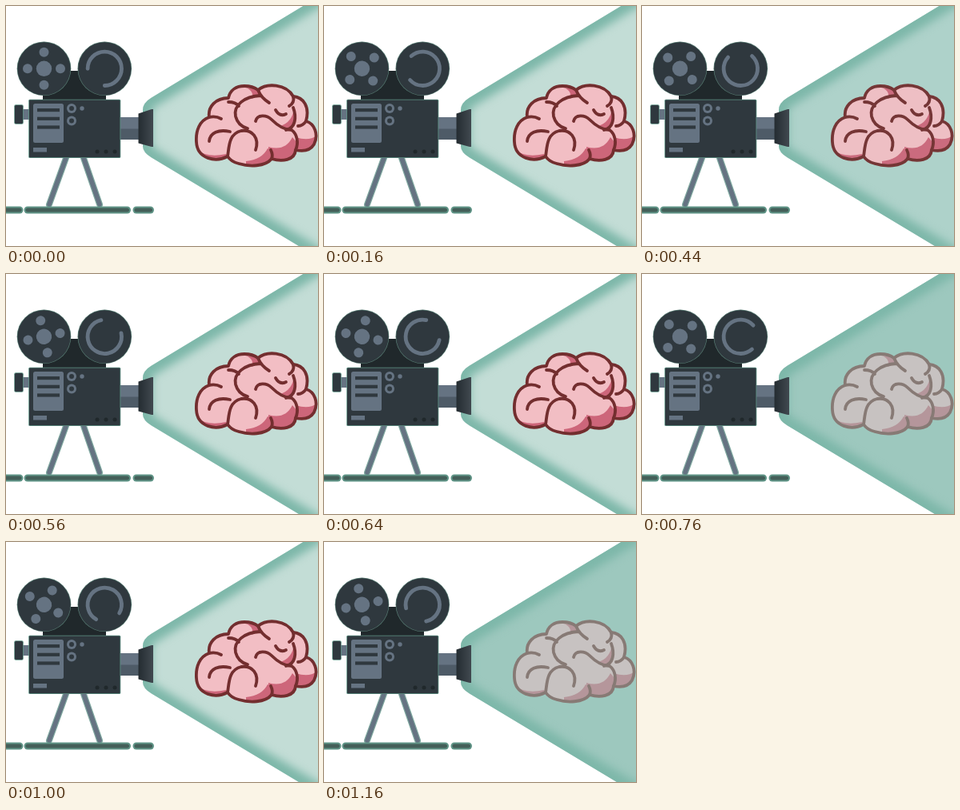
Write an HTML page with a canvas that moves like this. It is 390 by 300 pixels and loops after 1.2 s.

```html
<!DOCTYPE html>
<html lang="en">
<head>
<meta charset="utf-8">
<title>Projector</title>
<style>
html, body { margin: 0; width: 100%; height: 100%; overflow: hidden; background: #fff; }
canvas { display: block; }
</style>
</head>
<body>
<canvas id="stage" width="390" height="300"></canvas>
<script>
const W = 390, H = 300, STEP = 40, STEPS = 30;
const ctx = document.getElementById('stage').getContext('2d');
const DARK = '#2f383e', DEEP = '#20282b', GRAY = '#657382', RIM = '#7db7a9', FRINGE = '#5f9486';
const PINK = '#f2bec4', ROSE = '#cd667a', LINE = '#732e2f';

// Flicker, repeated three times per loop: beam level and brain opacity
const BEAM = ['#c3ddd6', '#aed2ca', '#9dc8be'];
const LEVEL = [0, 1, 1, 1, 0, 0, 0, 0, 1, 2];
const ALPHA = [1, .95, .8, .9, 1, 1, 1, 1, .75, .5];

function layer(draw) {
  const c = document.createElement('canvas');
  c.width = W;
  c.height = H;
  draw(c.getContext('2d'));
  return c;
}

function disc(g, x, y, r, color) {
  g.fillStyle = color;
  g.beginPath();
  g.arc(x, y, r, 0, 7);
  g.fill();
}

function box(g, x, y, w, h, r, color) {
  g.fillStyle = color;
  g.beginPath();
  g.roundRect(x, y, w, h, r);
  g.fill();
}

function fringedBox(g, x, y, w, h, r, color) {
  box(g, x - .8, y - .8, w + 1.6, h + 1.6, r + .5, FRINGE);
  box(g, x, y, w, h, r, color);
}

function line(g, x1, y1, x2, y2, width, color) {
  g.lineCap = 'round';
  g.lineWidth = width;
  g.strokeStyle = color;
  g.beginPath();
  g.moveTo(x1, y1);
  g.lineTo(x2, y2);
  g.stroke();
}

function poly(g, d, color) {
  g.fillStyle = color;
  g.fill(new Path2D(d));
}

const cone = new Path2D('M450 -47.5 L182 114.5 Q171 121 171 130 V175 Q171 183 182 189.5 L450 350.5 Z');

const rim = layer(g => {
  g.clip(cone);
  g.strokeStyle = RIM;
  g.filter = 'blur(5.5px)';
  g.lineWidth = 24;
  g.stroke(cone);
});

const brain = layer(g => {
  const shape = new Path2D(`M238 170 C237 156 242 143 254 139
    C252 126 262 115 278 115 C280 105 288 100 298 100 C306 100 311 102 315 105
    C326 96 350 97 359 113 C372 114 380 126 375 144
    C386 147 391 161 385 173 C380 181 371 182 362 180
    C361 193 345 195 332 191 C324 201 304 201 291 197
    C282 195 279 191 277 188 C262 196 239 191 238 170 Z`);
  g.fillStyle = PINK;
  g.fill(shape);
  g.save();
  g.clip(shape);
  poly(g, 'M390 160 Q381 170 362 164 L362 184 Q390 188 390 160 Z', ROSE);
  poly(g, 'M328 176 Q349 182 358 164 Q367 172 363 184 Q355 197 329 193 Z', ROSE);
  poly(g, 'M300 194 Q320 192 327 178 Q336 181 331 193 Q320 203 300 200 Z', ROSE);
  poly(g, 'M239 180 Q252 190 275 185 L278 190 Q250 200 239 180 Z', ROSE);
  poly(g, 'M360 128 Q358 145 343 150 Q354 158 361 149 Q365 139 360 128 Z', ROSE);
  poly(g, 'M300 102 Q311 107 307 116 L317 112 L316 104 Z', ROSE);
  g.restore();
  g.strokeStyle = LINE;
  g.lineWidth = 3.8;
  g.lineCap = g.lineJoin = 'round';
  g.stroke(shape);
  g.stroke(new Path2D(`M254 169 C255 158 266 154 280 157
    M254 139 Q262 137 269 141 M278 120 Q287 120 291 125
    M318 112 C298 113 284 124 287 138 Q290 150 302 153
    M277 188 C279 176 278 160 294 156 C308 154 317 165 312 180
    M315 105 Q319 115 329 121
    M312 144 C314 135 326 136 332 142 C340 150 348 155 357 155
    M337 130 Q342 139 350 135 M359 113 Q361 121 354 125
    M359 127 C364 140 361 153 350 155
    M375 144 Q371 150 365 150
    M357 155 C364 160 366 171 362 180 M331 180 Q334 186 332 191`));
});

const camera = layer(g => {
  // Ground and tripod
  for (const [a, b] of [[75, 54], [97, 117]]) {
    line(g, a, 190, b, 248, 8, '#80aaa1');
    line(g, a, 190, b, 248, 5.6, GRAY);
  }
  for (const [a, b] of [[-5, 17], [27, 151.5], [163, 180.5]]) {
    line(g, a, 255, b, 255, 9, FRINGE);
    line(g, a, 255, b, 255, 5, '#445f59');
  }

  // Viewfinder and lens
  box(g, 20, 129, 10, 13, 0, GRAY);
  fringedBox(g, 11, 124, 10, 23, 1.5, DARK);
  box(g, 141, 139, 27, 28, 0, GRAY);
  box(g, 141, 153.5, 27, 13.5, 0, '#4e5b67');
  const hood = g.createLinearGradient(166, 0, 184, 0);
  hood.addColorStop(0, '#252d32');
  hood.addColorStop(1, '#414950');
  poly(g, 'M165.5 134.5 L182 129 H184 V176 H182 L165.5 171.5 Z', hood);

  // Body
  box(g, 46, 81, 79, 38, 0, DEEP);
  fringedBox(g, 29, 117.5, 113.5, 71.7, 1, DARK);
  box(g, 34, 122, 38, 49, 2.5, GRAY);
  for (const y of [128, 138.7, 149.4]) box(g, 39, y, 28, 4.2, 0, DARK);
  box(g, 34, 177, 17, 5.5, 0, GRAY);
  for (const y of [128, 143.5]) {
    disc(g, 82, y, 6, GRAY);
    disc(g, 82, y, 3, DARK);
  }
  disc(g, 95, 128, 2.7, GRAY);
  for (const x of [114, 125, 136]) disc(g, x, 182, 2.5, DEEP);

  // Reels
  for (const x of [47.5, 123.3]) {
    disc(g, x, 78.3, 33.8, '#557a71');
    disc(g, x, 78.3, 33.1, DARK);
  }
});

function spin(x, y, angle, draw) {
  ctx.save();
  ctx.translate(x, y);
  ctx.rotate(angle);
  draw();
  ctx.restore();
}

function render(ms) {
  const step = Math.floor(ms / STEP) % STEPS;
  const angle = step / STEPS * 2 * Math.PI;
  const beat = step % LEVEL.length;

  ctx.fillStyle = '#fff';
  ctx.fillRect(0, 0, W, H);
  ctx.fillStyle = BEAM[LEVEL[beat]];
  ctx.fill(cone);
  ctx.drawImage(rim, 0, 0);
  ctx.globalAlpha = ALPHA[beat];
  ctx.drawImage(brain, 0, 0);
  ctx.globalAlpha = 1;
  ctx.drawImage(camera, 0, 0);

  spin(47.5, 78.3, angle, () => {
    disc(ctx, 0, 0, 9.7, GRAY);
    for (const [x, y] of [[0, -1], [1, 0], [0, 1], [-1, 0]]) disc(ctx, x * 20.5, y * 20.5, 6, GRAY);
  });
  spin(123.3, 78.3, angle, () => {
    ctx.strokeStyle = GRAY;
    ctx.lineWidth = 4.8;
    ctx.lineCap = 'round';
    ctx.beginPath();
    ctx.arc(0, 0, 21.2, Math.PI, Math.PI * 2.5);
    ctx.stroke();
  });
}

const start = performance.now();
function tick() {
  render(performance.now() - start);
  requestAnimationFrame(tick);
}
tick();
</script>
</body>
</html>
```
